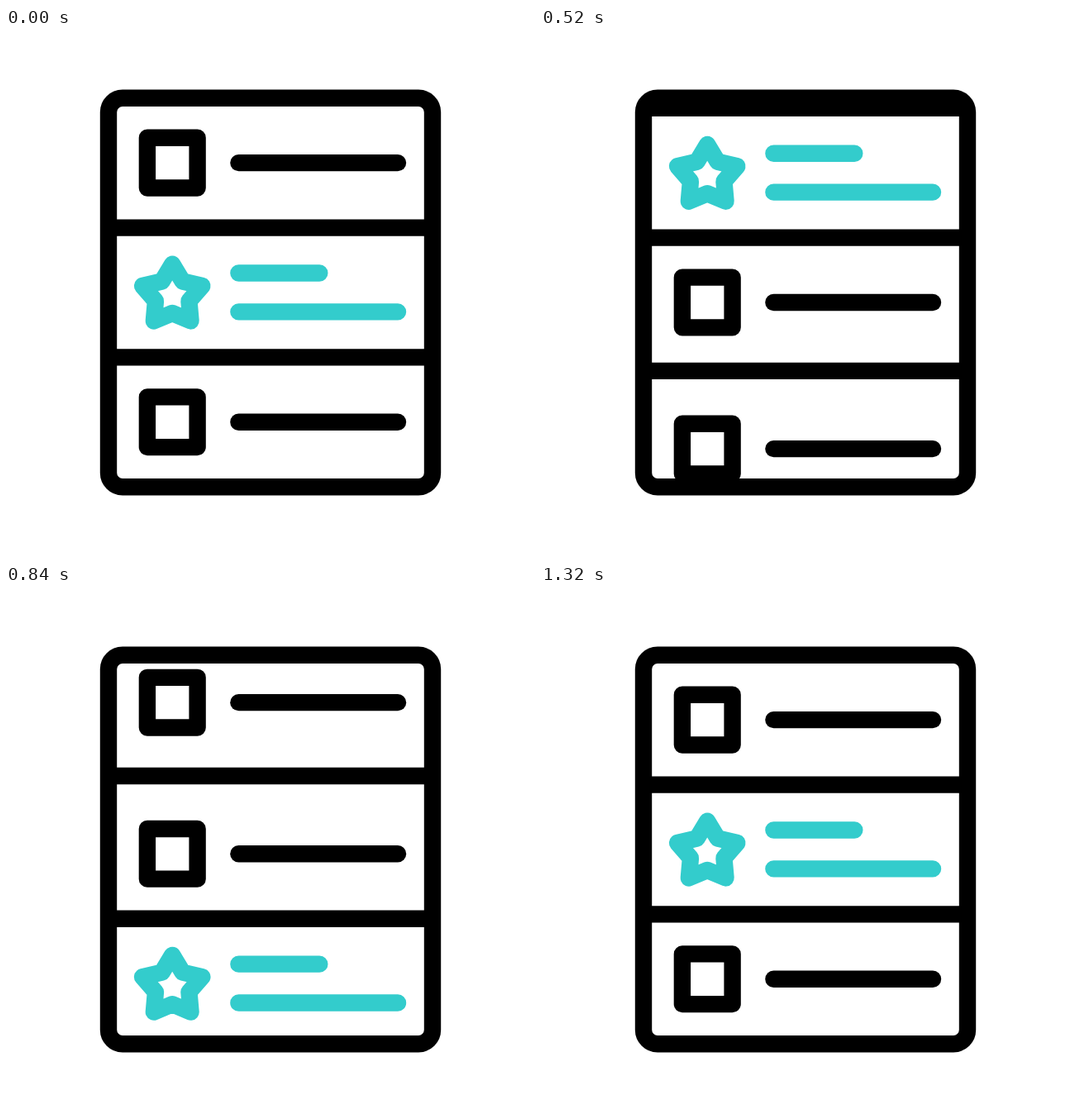
These frames come from a looping animation (640x640 px, 1480 ms). An HTML page:

```html
<!DOCTYPE html>
<html lang="en">
<head>
<meta charset="utf-8">
<title>Scrolling list</title>
<style>
  html, body { margin: 0; width: 100%; height: 100%; overflow: hidden; background: #fff; }
  svg { display: block; width: 100vw; height: 100vh; }
  .ink { fill: none; stroke: #000; stroke-width: 20.4; stroke-linecap: round; stroke-linejoin: round; }
  .accent { stroke: #33cccc; }
</style>
</head>
<body>
<svg viewBox="0 0 640 640">
  <defs>
    <clipPath id="window"><rect x="124" y="85" width="392" height="470"/></clipPath>
    <g id="item">
      <rect x="170.9" y="132.8" width="60.7" height="60.7"/>
      <path d="M281.4 163.1H474"/>
    </g>
    <path id="rule" d="M124 0H516"/>
    <g id="list">
      <use href="#item"/>
      <use href="#rule" y="241.6"/>
      <g class="accent">
        <path id="star"/>
        <path d="M281.4 296.5H379.3M281.4 343.4H474"/>
      </g>
      <use href="#rule" y="398.4"/>
      <use href="#item" y="313.6"/>
    </g>
  </defs>
  <g class="ink">
    <g clip-path="url(#window)">
      <g id="leaving"><use href="#list"/></g>
      <g id="entering" transform="translate(0 486.2)">
        <use href="#rule" y="68.9"/>
        <use href="#list"/>
      </g>
    </g>
    <rect x="124" y="84.8" width="392" height="470.4" rx="17"/>
  </g>
</svg>
<script>
  const LOOP = 1480, STEP = 40, DELAY = 80, STEPS = 31;
  const LEAVE = 502, ENTER = 486.2;
  const byId = id => document.getElementById(id);
  const leaving = byId('leaving'), entering = byId('entering');

  function starPath(cx, cy, outer, inner) {
    const points = Array.from({ length: 10 }, (_, i) => {
      const r = i % 2 ? inner : outer, a = i * Math.PI / 5;
      return (cx + r * Math.sin(a)).toFixed(2) + ' ' + (cy - r * Math.cos(a)).toFixed(2);
    });
    return 'M' + points.join('L') + 'Z';
  }

  const ease = s => s * s * (3 - 2 * s);
  const shift = (el, y) => el.setAttribute('transform', `translate(0 ${y.toFixed(2)})`);

  // The list advances in 40 ms steps along a smooth ease in and out.
  function draw(now) {
    const t = now % LOOP;
    const k = Math.floor((t + 0.5 - DELAY) / STEP);
    const p = ease(Math.min(Math.max(k / STEPS, 0), 1));
    shift(leaving, -LEAVE * p);
    shift(entering, ENTER * (1 - p));
    requestAnimationFrame(draw);
  }

  byId('star').setAttribute('d', starPath(201.2, 323.7, 38, 21.3));
  requestAnimationFrame(draw);
</script>
</body>
</html>
```
